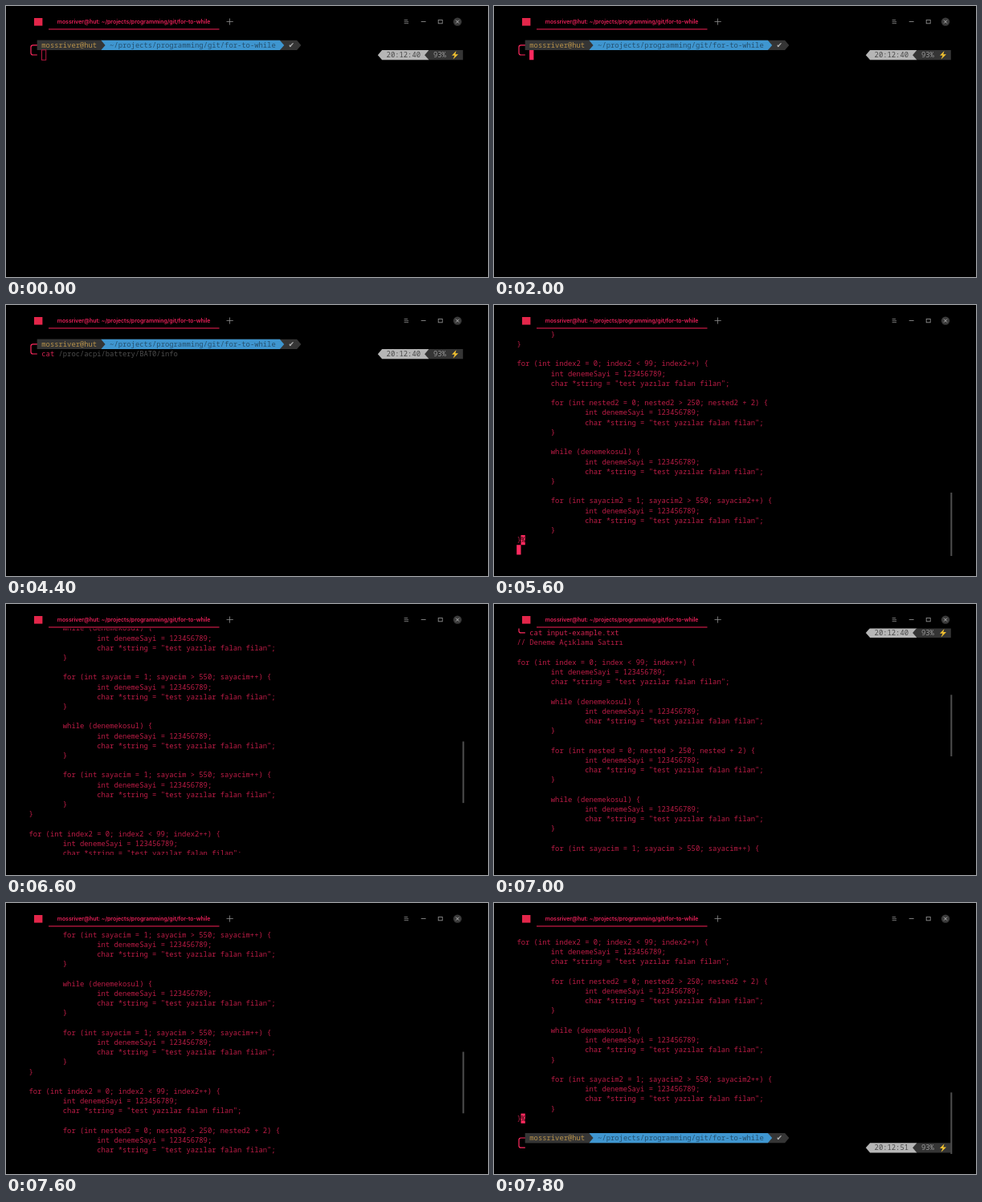
Recreate the animation shown at these times as an HTML page with a canvas. Size 600 by 338 pixels, loop 8000 ms.

```html
<!DOCTYPE html>
<html lang="en">
<head>
<meta charset="utf-8">
<title>Terminal</title>
<style>
html, body { margin: 0; width: 100%; height: 100%; overflow: hidden; background: #000; }
canvas { display: block; width: 100vw; height: 100vh; }
</style>
</head>
<body>
<canvas id="c" width="600" height="338"></canvas>
<script>
const ctx = document.getElementById('c').getContext('2d');
const LOOP = 8000, STEP = 200;
const X0 = 28.2, CW = 5.3, ROW = 12.21, TOP = 30.6, BOTTOM = 313;
const MONO = '8.83px "Noto Sans Mono", monospace';
const PINK = '#ff2a5f', CODE = '#bd1c46', DARK = '#353535', BLUE = '#3f96d0', PALE = '#b6b6b6';
const USER = 'mossriver@hut', DIR = '~/projects/programming/git/for-to-while';
const OLD_CMD = 'cat /proc/acpi/battery/BAT0/info', NEW_CMD = 'cat input-example.txt';

// Document rows; the first prompt takes rows 1 and 2
const block = (head, indent) => [
  [indent, head + ' {'],
  [indent + 8, 'int denemeSayi = 123456789;'],
  [indent + 8, 'char *string = "test yazılar falan filan";']
];
const inner = head => [[0, ''], ...block(head, 8), [8, '}']];
const loop = (n, from, cmp, to, step) => `for (int ${n} = ${from}; ${n} ${cmp} ${to}; ${n}${step})`;
const outer = n => block(loop(n, 0, '<', 99, '++'), 0);
const nested = n => inner(loop(n, 0, '>', 250, ' + 2'));
const counter = n => inner(loop(n, 1, '>', 550, '++'));
const wait = () => inner('while (denemekosul)');
const output = [
  [0, '// Deneme Açıklama Satırı'], [0, ''],
  ...outer('index'), ...wait(), ...nested('nested'),
  ...wait(), ...counter('sayacim'), ...wait(), ...counter('sayacim'),
  [0, '}'], [0, ''],
  ...outer('index2'), ...nested('nested2'), ...wait(), ...counter('sayacim2'),
  [0, '}']
];
const FIRST = 3, LAST = FIRST + output.length - 1;

const col = n => X0 + n * CW;

function rect(x, y, w, h, color) {
  ctx.fillStyle = color;
  ctx.fillRect(x, y, w, h);
}

function poly(color, ...pts) {
  ctx.fillStyle = color;
  ctx.beginPath();
  for (let i = 0; i < pts.length; i += 2) ctx.lineTo(pts[i], pts[i + 1]);
  ctx.fill();
}

function line(color, width, ...pts) {
  ctx.strokeStyle = color;
  ctx.lineWidth = width;
  ctx.beginPath();
  for (let i = 0; i < pts.length; i += 4) {
    ctx.moveTo(pts[i], pts[i + 1]);
    ctx.lineTo(pts[i + 2], pts[i + 3]);
  }
  ctx.stroke();
}

function text(s, x, y, color, font = MONO) {
  ctx.font = font;
  ctx.fillStyle = color;
  ctx.fillText(s, x, y);
}

const write = (s, c, y, color) => text(s, col(c) + 0.2, y + 9.2, color);

// Segment with an arrow head one cell wide on its right end
function segment(from, to, y, color) {
  const a = col(from), b = col(to), e = col(to + 1);
  poly(color, a, y, b, y, e, y + ROW / 2, b, y + ROW, a, y + ROW);
}

function leftSegment(from, to, y, color) {
  const a = col(from), b = col(from + 1), e = col(to);
  poly(color, a, y + ROW / 2, b, y, e, y, e, y + ROW, b, y + ROW);
}

function prompt(y, clock) {
  segment(2, 63, y, DARK);
  segment(17, 59, y, BLUE);
  segment(2, 17, y, DARK);
  write(USER, 3, y, '#b8924a');
  write(DIR, 19, y, '#24506f');
  text('✔', col(61), y + 9.2, '#b4b4b4', '9px "DejaVu Sans", sans-serif');

  const y2 = y + ROW, x = 31, end = col(2);
  ctx.strokeStyle = PINK;
  ctx.lineWidth = 1.2;
  ctx.beginPath();
  ctx.moveTo(end, y + 6);
  ctx.arcTo(x, y + 6, x, y + 12, 2.5);
  ctx.arcTo(x, y2 + 6, end, y2 + 6, 2.5);
  ctx.lineTo(end, y2 + 6);
  ctx.stroke();

  leftSegment(82, 94, y2, PALE);
  leftSegment(93, 102, y2, DARK);
  write(clock, 84, y2, '#4a4a4a');
  write('93%', 95, y2, '#989898');
  poly('#f2c230', 560.5, y2 + 1, 555, y2 + 6.8, 558.5, y2 + 6.8, 556.5, y2 + 11.5,
    563, y2 + 5.2, 559.3, y2 + 5.2);
}

function cursor(c, y, hollow) {
  if (hollow) {
    ctx.strokeStyle = '#b3183f';
    ctx.lineWidth = 1;
    ctx.strokeRect(col(c) + 0.4, y - 0.2, 5.2, 12.5);
  } else {
    rect(col(c), y, CW, ROW, PINK);
  }
}

// What stands on the command line: typed part and faded suggestion
function command(t) {
  if (t < 2200) return ['', ''];
  if (t < 4800) {
    const n = t < 2400 ? 1 : t < 2600 ? 2 : t < 3200 ? 3 : 4;
    return [OLD_CMD.slice(0, n), OLD_CMD.slice(n)];
  }
  const n = t < 5000 ? 5 : t < 5200 ? 6 : NEW_CMD.length;
  return [NEW_CMD.slice(0, n), NEW_CMD.slice(n)];
}

function cursorOn(t) {
  if (t < 2000) return t < 1400;
  if (t < 3400) return true;
  if (t < 4800) return t >= 3800 && t < 4400;
  if (t < 5800) return true;
  return (t - 5800) % 1200 < 600;
}

const path = [[6000, 39], [6200, 36.5], [6600, 19.53], [7200, -6.68], [7800, 39]];
function scrollAt(t) {
  if (t < 5600) return 0;
  if (t < 5800) return 37;
  for (let i = 1; i < path.length; i++) {
    const [a, p] = path[i - 1], [b, q] = path[i];
    if (t < b) return p + (q - p) * Math.max(0, (t - a) / (b - a));
  }
  return 39;
}

function terminal(t) {
  const s = scrollAt(t), rowY = r => TOP + (r - s) * ROW;
  ctx.save();
  ctx.beginPath();
  ctx.rect(0, TOP, 600, BOTTOM - TOP);
  ctx.clip();
  prompt(rowY(1), '20:12:40');

  const [typed, hint] = command(t), y = rowY(2);
  write(typed, 3, y, '#d02350');
  write(hint, 3 + typed.length, y, '#4c4c4c');

  if (t < 5600) {
    if (cursorOn(t)) cursor(3 + typed.length, y, t < 800);
  } else {
    output.forEach(([indent, s], i) => write(s, indent, rowY(FIRST + i), CODE));
    rect(col(1), rowY(LAST), CW, ROW, PINK);
    write('%', 1, rowY(LAST), '#200008');
    if (t < 5800) {
      cursor(0, rowY(LAST + 1));
    } else {
      prompt(rowY(LAST + 2), '20:12:51');
      if (cursorOn(t)) cursor(3, rowY(LAST + 3));
    }
    const top = t < 5800 ? 234 : 236.3 + (s - 39) * 3.33;
    rect(568.3, top, 2, t < 5800 ? 79 : 76.7, '#4e4e4e');
  }
  ctx.restore();
}

function titleBar() {
  rect(35, 15, 10.4, 9.6, '#e3264a');
  text(USER + ': ' + DIR, 63.7, 22, '#ec205a', '600 6.92px Inter, sans-serif');
  rect(53, 28.4, 212.5, 1.1, '#e01f4f');
  const grey = '#8c8c8c';
  line(grey, 0.8, 274.5, 19.5, 282.8, 19.5, 278.5, 15.5, 278.5, 23.6);
  line(grey, 0.8, 495.6, 17.5, 500, 17.5, 495.6, 19.6, 501, 19.6, 495.6, 21.7, 501, 21.7);
  line(grey, 0.9, 516.7, 19.5, 522.6, 19.5);
  ctx.strokeRect(538.2, 17.4, 5, 4.4);
  ctx.fillStyle = '#3a3a3a';
  ctx.beginPath();
  ctx.arc(562, 19.6, 5.2, 0, 7);
  ctx.fill();
  line('#b8b8b8', 0.9, 560, 17.6, 564, 21.6, 564, 17.6, 560, 21.6);
}

function draw(now) {
  const t = Math.floor((now % LOOP) / STEP) * STEP;
  rect(0, 0, 600, 338, '#000');
  terminal(t);
  titleBar();
}

const start = performance.now();
function tick() {
  draw(performance.now() - start);
  requestAnimationFrame(tick);
}
tick();
</script>
</body>
</html>
```
